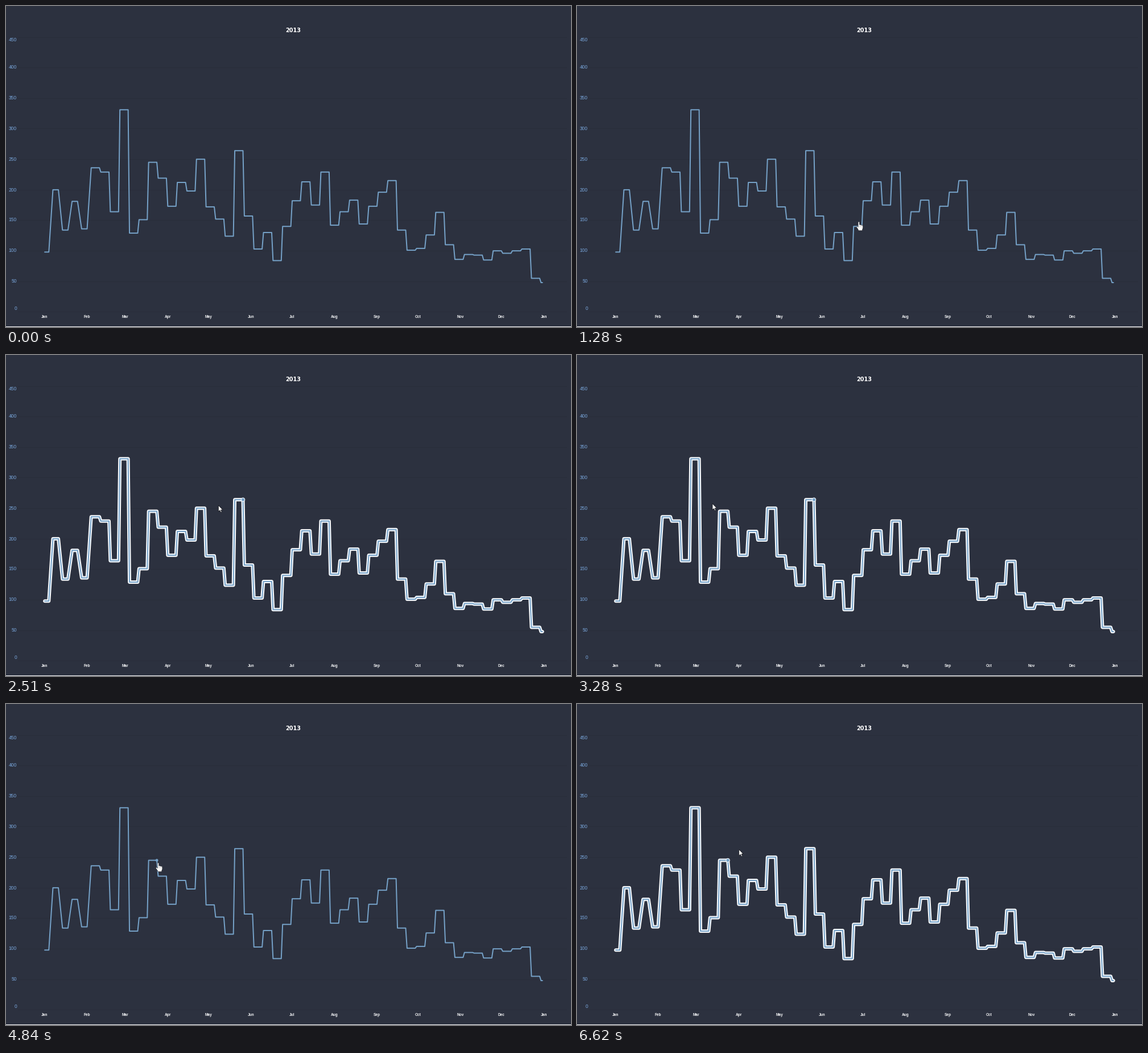
A matplotlib script for the animation above (8 s loop, 993x564 px).

```python
import numpy as np
import matplotlib.pyplot as plt
from matplotlib.animation import FuncAnimation
from matplotlib.patches import Circle, Polygon, Rectangle
from matplotlib.patheffects import withStroke

W, H, DPI = 993, 564, 64
PX = 72 / DPI  # points per pixel
LOOP, STEP = 8000, 20
TICK = 76.7  # ms between two pointer positions

BG, GRID, BLUE, LABEL = "#2c313f", "#292d3a", "#75a1c7", "#78a5da"
HALO, INK = "#f7fafd", "#14161c"

# the plotted data: one value per week of the year
VALUES = [97, 199, 133, 180, 135, 235, 228, 163, 330, 128, 150, 244, 218, 172,
          211, 197, 249, 171, 151, 123, 263, 156, 102, 129, 83, 139, 181, 212,
          174, 228, 141, 163, 182, 143, 172, 195, 214, 133, 100, 103, 125, 162,
          109, 85, 93, 92, 84, 99, 95, 99, 102, 54, 47]
MONTHS = "Jan Feb Mar Apr May Jun Jul Aug Sep Oct Nov Dec Jan".split()


def day_x(day):
    return 68.05 + 2.403 * day


def value_y(value):
    return 536.4 - 1.073 * value


def week_ends(week):
    """First and last day on which a week's value holds."""
    first = max(7 * week - 1, 0)
    length = 3 if week == 0 else 4 if week < 5 else 6
    return first, min(first + length, 364)


def week_dot(week):
    return day_x(week_ends(week)[1]), value_y(VALUES[week])


def smooth(u):
    return u * u * (3 - 2 * u)


# pointer legs: first tick, last tick, place reached
START = (851, 538)
LEGS = [
    (130, 590, (499, 384.5)), (1280, 1820, (413.5, 257)),
    (2360, 2510, (373.3, 264)), (2590, 2670, (277.5, 244.5)),
    (2900, 3280, (238, 261)), (3910, 4210, (252.5, 274)),
    (4690, 4840, (267.5, 279)), (5930, 6160, (279.3, 261)),
    (6390, 6620, (284.7, 255.5)),
]
HAND_TIMES = [(820, 1360), (1820, 2360), (4840, 5930)]
HALO_TIMES = [(2050, 3830), (5450, LOOP)]
# week whose corner carries the dot
DOT_TIMES = [(820, 1280, 25), (1820, 3830, 20), (4840, LOOP, 11)]


def within(t, spans):
    return any(a <= t < b for a, b in spans)


def pointer_at(t):
    """Place of the pointer, or None before it enters."""
    if t < LEGS[0][0]:
        return None
    pos = np.array(START, float)
    for first, last, goal in LEGS:
        if t < first:
            break
        steps = round((last - first) / TICK) + 1
        done = min(int((t - first + 5) / TICK) + 1, steps)
        pos = pos + smooth(done / steps) * (goal - pos)
    return pos


def hand_strokes():
    """Strokes of a pointing hand, with its finger tip at the origin."""
    fingers = [((2 * k, 5.4 + 0.6 * k if k else 1.1), (2 * k, 11))
               for k in range(4)]
    palm = [((0, y), (6 - 0.4 * i, y)) for i, y in enumerate((11, 12.7, 14.4))]
    thumb = [((-3, 9.3), (0, 13))]
    gap = (np.nan, np.nan)
    return np.array([p for a, b in fingers + palm + thumb for p in (a, b, gap)])


ARROW = np.array([(0, 0), (0, 11.2), (2.6, 8.8), (4.2, 12.6), (6, 11.8),
                  (4.4, 8.1), (7.8, 8.1)])
HAND = hand_strokes()

fig = plt.figure(figsize=(W / DPI, H / DPI), dpi=DPI, facecolor=BG)
ax = fig.add_axes([0, 0, 1, 1])
ax.set_xlim(0, W)
ax.set_ylim(H, 0)
ax.axis("off")


def label(x, y, text, size, color, ha="center", weight="bold",
          family="Liberation Sans"):
    ax.text(x, y, text, fontsize=size * PX, color=color, ha=ha,
            va="baseline", weight=weight, family=family)


ax.add_patch(Rectangle((0, 563), W, 1, color="white", lw=0))
label(505, 46.5, "2013", 9.8, "white", family="DejaVu Sans")
for value in range(0, 451, 50):
    y = round(value_y(value)) + 0.5
    ax.plot([21, 985], [y, y], color=GRID, lw=PX)
    middle = min(max(y, 58.5), 531)
    label(19, middle + 3, value, 8.5, LABEL, ha="right", weight="normal")

firsts = np.arange("2013-01", "2014-02", dtype="datetime64[M]")
days = firsts.astype("datetime64[D]") - np.datetime64("2013-01-01")
for day, month in zip(days.astype(int), MONTHS):
    label(day_x(day), 548, month, 6.5, "#f0f1f3")

xs = [day_x(d) for week in range(len(VALUES)) for d in week_ends(week)]
ys = value_y(np.repeat(VALUES, 2))
style = dict(solid_joinstyle="round", solid_capstyle="round")
halo, = ax.plot(xs, ys, color=HALO, lw=6 * PX, zorder=3, **style)
ax.plot(xs, ys, color=BLUE, lw=2 * PX, zorder=4, **style)
dot = ax.add_patch(Circle((0, 0), 1, fc=BLUE, ec=HALO, zorder=5))
arrow = ax.add_patch(Polygon(ARROW, fc="white", ec=INK, lw=0.8 * PX, zorder=6))
hand, = ax.plot([], [], color="white", lw=1.8 * PX, zorder=6, **style,
                path_effects=[withStroke(linewidth=2.8 * PX, foreground=INK)])


def draw(i):
    t = i * STEP + STEP / 2
    picked = within(t, HALO_TIMES)
    pointing = within(t, HAND_TIMES)
    halo.set_visible(picked)

    dot.set_visible(False)
    for start, stop, week in DOT_TIMES:
        if start <= t < stop:
            dot.set_visible(True)
            dot.set_center(week_dot(week))
    dot.set_radius((4.5 if pointing else 3.2) if picked else 2.4)
    dot.set_linewidth(PX if picked else 0)

    pos = pointer_at(t)
    arrow.set_visible(pos is not None and not pointing)
    hand.set_visible(pointing)
    if pos is not None:
        arrow.set_xy(ARROW + pos)
        hand.set_data(*(HAND + pos).T)
    return halo, dot, arrow, hand


anim = FuncAnimation(fig, draw, frames=LOOP // STEP, interval=STEP,
                     repeat=True, repeat_delay=0, blit=False)
plt.show()
```
